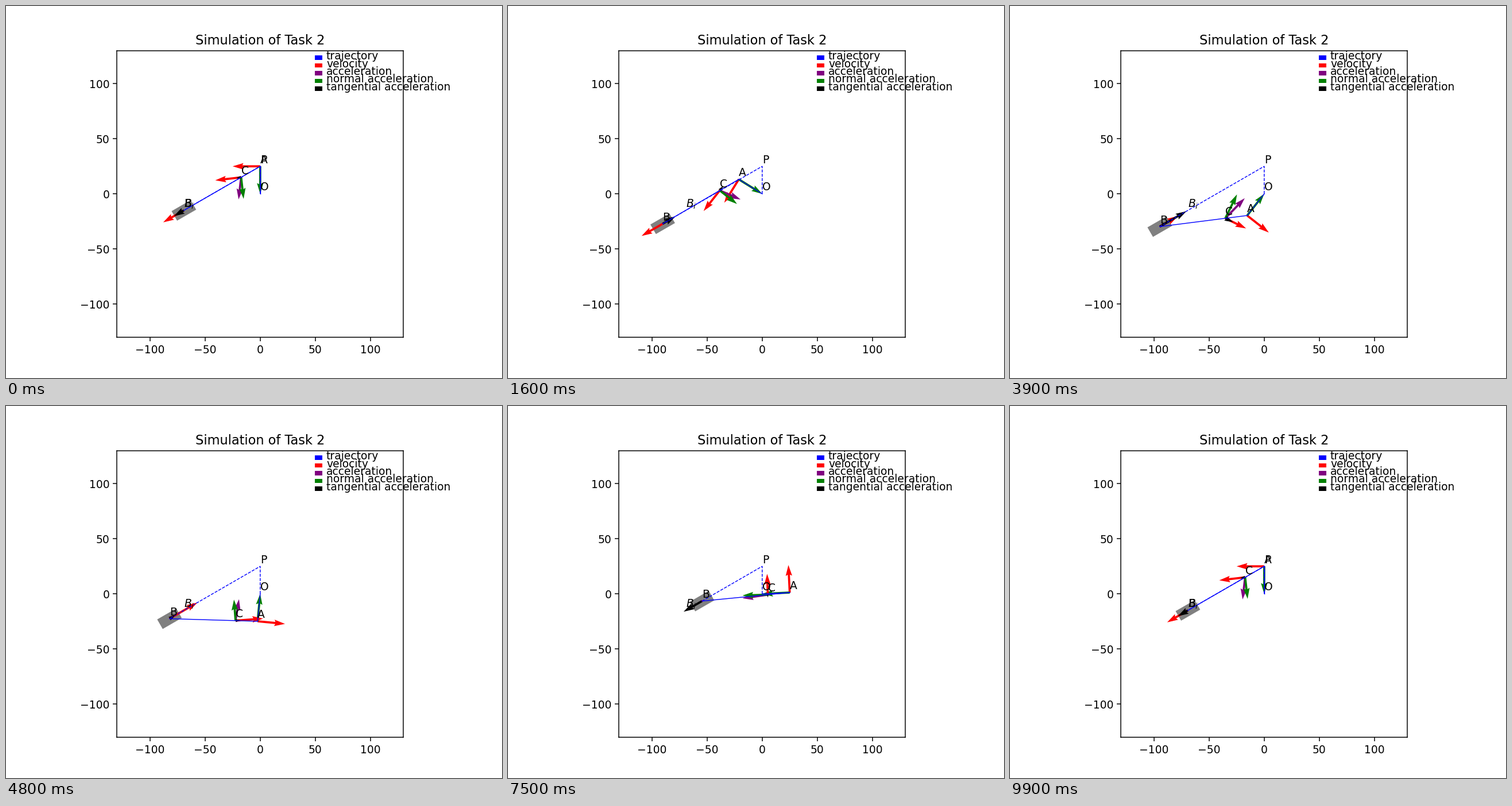
A matplotlib script that plays this animation: 864 by 648 pixels, repeating every 10000 ms.

```python
import numpy as np
import matplotlib.pyplot as plt
from matplotlib.animation import FuncAnimation
from matplotlib.patches import Rectangle

FRAMES = 100
OA, AB, AC = 25, 80, 20
TILT = np.radians(30)
RAIL = -np.array([np.cos(TILT), np.sin(TILT)])  # slider direction, away from P
O, P = np.zeros(2), np.array([0.0, OA])
START = P + AB * RAIL
LABEL_DY = 3

plt.rcParams["font.family"] = "DejaVu Sans"
fig, ax = plt.subplots(figsize=(6.4, 4.8), dpi=135)
ax.set_aspect("equal")
ax.set(xlim=(-130, 130), ylim=(-130, 130), title="Simulation of Task 2")


def solve(i):
    """Positions, velocities and accelerations of the crank A, slider B and rod point C."""
    t = np.pi / 2 + 2 * np.pi * i / (FRAMES - 1)
    a = OA * np.array([np.cos(t), np.sin(t)])
    va, aa = np.array([-a[1], a[0]]), -a

    w = a - P
    k = w @ RAIL
    b = P + RAIL * (k + np.sqrt(k * k - w @ w + AB ** 2))
    e = (b - a) / AB
    vb = RAIL * (va @ e) / (RAIL @ e)
    rel = vb - va
    ab = RAIL * (aa @ e - rel @ rel / AB) / (RAIL @ e)

    def mix(p, q):
        return p + (q - p) * AC / AB

    return (a, va, aa), (b, vb, ab), (mix(a, b), mix(va, vb), mix(aa, ab))


def split(v, acc):
    """Normal and tangential parts of an acceleration."""
    tang = v * (acc @ v) / (v @ v)
    return acc - tang, tang


def arrow(color):
    return ax.quiver([0], [0], [1], [0], color=color, angles="xy",
                     scale_units="xy", scale=1)


def place(q, pos, vec):
    q.set_offsets([pos])
    q.set_UVC([vec[0]], [vec[1]])


def line(style="-"):
    return ax.plot([], [], style, color="blue", lw=0.75)[0]


def join(ln, *pts):
    ln.set_data(*np.transpose(pts))


def label(s, pos=O):
    return ax.text(pos[0], pos[1] + LABEL_DY, s)


legend = [("trajectory", "blue"), ("velocity", "red"), ("acceleration", "purple"),
          ("normal acceleration", "green"), ("tangential acceleration", "black")]
for row, (name, color) in enumerate(legend):
    y = 122 - 7 * row
    ax.add_patch(Rectangle((49.6, y - 0.4), 7, 4, color=color, lw=0))
    ax.text(60, y, name)

slider = ax.add_patch(Rectangle((0, 0), 20, 10, angle=30, rotation_point="center",
                                color="gray", lw=0))
arrows_a = [arrow(c) for c in ("red", "green")]
arrows_b = [arrow(c) for c in ("red", "black")]
arrows_c = [arrow(c) for c in ("red", "purple", "green", "black")]
rail, crank, rod = line("--"), line(), line()
label("O")
label("P", P)
label("$B_i$", START)
tags = [label(s) for s in "ABC"]


def update(i):
    bodies = solve(i)
    (a, va, aa), (b, vb, ab), (c, vc, ac) = bodies
    slider.set_xy(b - (10, 5))
    for arrows, pos, vecs in ((arrows_a, a, (va, aa)),
                              (arrows_b, b, (vb, ab)),
                              (arrows_c, c, (vc, ac, *split(vc, ac)))):
        for q, vec in zip(arrows, vecs):
            place(q, pos, vec)
    join(rail, O, P, b)
    join(crank, O, a)
    join(rod, a, b)
    for tag, (pos, _, _) in zip(tags, bodies):
        tag.set_position(pos + (0, LABEL_DY))
    return []


anim = FuncAnimation(fig, update, frames=FRAMES, interval=100, repeat=True,
                     repeat_delay=0, init_func=lambda: [])
plt.show()
```
